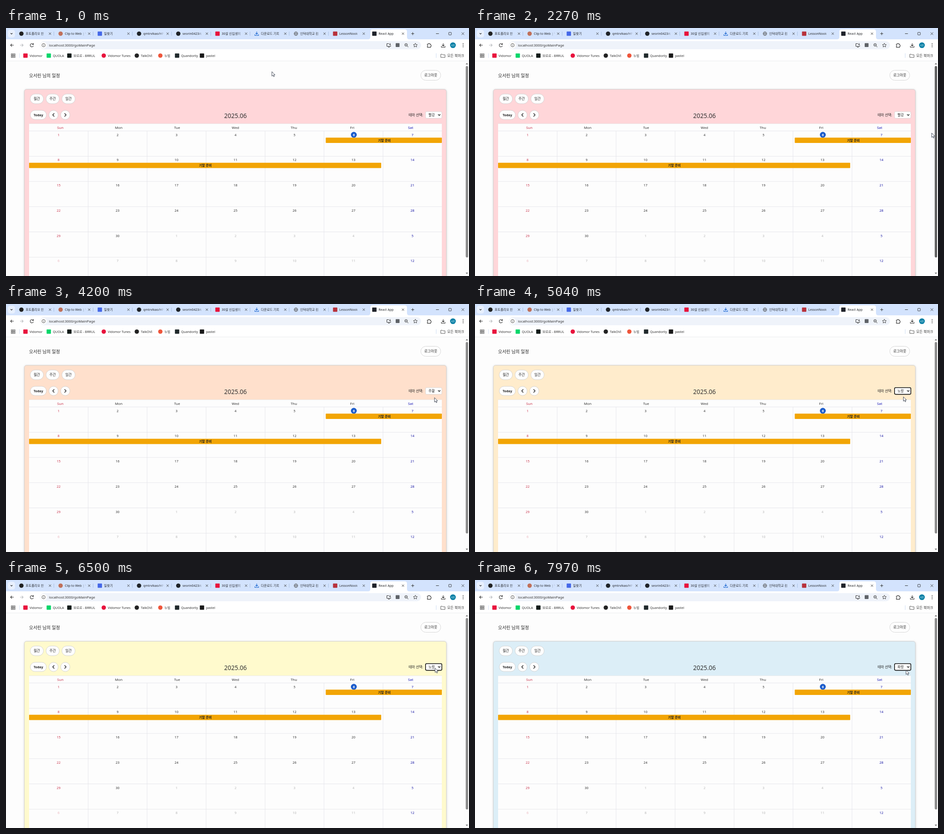
Write an HTML page that moves like this. It is 1023x548 px and loops after 8 s.

```html
<!DOCTYPE html>
<html lang="ko">
<head>
<meta charset="utf-8">
<title>Calendar themes</title>
<style>
html, body { margin: 0; width: 100%; height: 100%; overflow: hidden; background: #fdfdfd; }
svg { display: block; width: 1023px; height: 548px; }
text { font-family: 'Noto Sans', 'Noto Sans CJK KR', sans-serif; white-space: pre; }
</style>
</head>
<body>
<svg id="stage" viewBox="0 0 1023 548">
  <defs>
    <linearGradient id="fade">
      <stop stop-color="#d3e3fd" stop-opacity="0"/><stop offset="1" stop-color="#d3e3fd"/>
    </linearGradient>
    <clipPath id="titles"><rect id="clipBox" x="0" y="0" width="1023" height="25"/></clipPath>
    <filter id="soft" x="-5%" y="-5%" width="110%" height="110%"><feGaussianBlur stdDeviation="2"/></filter>
  </defs>
</svg>
<script>
const stage = document.getElementById('stage');
const out = [];
const add = s => out.push(s);
const rect = (x, y, w, h, fill, rx = 0, more = '') =>
  add(`<rect x="${x}" y="${y}" width="${w}" height="${h}" rx="${rx}" fill="${fill}" ${more}/>`);
const circle = (x, y, r, fill, more = '') =>
  add(`<circle cx="${x}" cy="${y}" r="${r}" fill="${fill}" ${more}/>`);
const path = (d, color = '#3c4043', width = 1, fill = 'none', more = '') =>
  add(`<path d="${d}" stroke="${color}" stroke-width="${width}" fill="${fill}" ${more}/>`);
const text = (s, x, y, size, fill = '#222', weight = 400, anchor = 'start', more = '') =>
  add(`<text x="${x}" y="${y}" font-size="${size}" fill="${fill}" font-weight="${weight}" text-anchor="${anchor}" ${more}>${s}</text>`);
const cross = (x, y, r) => path(`M${x - r} ${y - r}l${2 * r} ${2 * r}m0 ${-2 * r}l${-2 * r} ${2 * r}`, '#333', .9);
const mark = (round, x, y, r, color) =>
  round ? circle(x, y, r, color) : rect(x - r, y - r, 2 * r, 2 * r, color, 1);
const globe = (x, y) => {
  circle(x, y, 4, 'none', 'stroke="#555"');
  path(`M${x - 4} ${y}h8M${x} ${y - 4}q-3.5 4 0 8q3.5 -4 0 -8`, '#555', .8);
};
const download = (x, y, color) =>
  path(`M${x} ${y - 4.5}v6m-2.6 -2.6l2.6 2.6l2.6 -2.6M${x - 4} ${y + 1.5}v2.5h8v-2.5`, color, 1.2);

function tabs() {
  rect(0, 0, 1023, 25, '#d3e3fd');
  rect(4, 4, 16, 17, '#e8f0fe', 5);
  path('M10 11.3l2.2 2.2l2.2 -2.2', '#222', 1.1);
  path('M800 25q5 0 5 -5V8q0 -5 5 -5H881q5 0 5 5V20q0 5 5 5z', 'none', 0, '#fff');
  const list = [
    ['포트폴리오 한', 1, '#222'], ['Clip to Web | 변', 1, '#c0705a'], ['일찾기', 0, '#4568e8'],
    ['qmtrvlkao/HP', 1, '#1f2328'], ['seorin0423/c', 1, '#1f2328'], ['30살 신입생의', 0, '#e8123c'],
    ['다운로드 기록', 'arrow'], ['인덕대학교 컴', 'globe'], ['LessonNook', 0, '#b8323c'], ['React App', 0, '#20232a']];
  list.forEach(([name, kind, color], i) => {
    const x = 34 + 86.66 * i;
    if (kind === 'arrow') download(x, 12.5, '#1a66d0');
    else if (kind === 'globe') globe(x, 12.5);
    else mark(kind, x, 12.5, 4.8, color);
    text(name, x + 9.3, 15.3, 7, '#26282c');
    if (i < 9) {
      rect(x + 45, 4, 10, 18, 'url(#fade)');
      rect(x + 55, 4, 16, 18, '#d3e3fd');
      if (i < 8) rect(x + 71.4, 8, .8, 9, '#9fb8dc');
    }
    cross(x + 63.2, 12.5, 2.4);
  });
  path('M895.5 12.5h6.4m-3.2 -3.2v6.4M950 12.5h6.5', '#333', 1);
  rect(978.3, 9.7, 5.6, 5.6, 'none', .5, 'stroke="#333" stroke-width=".9"');
  cross(1009.5, 12.5, 2.8);
}

function toolbar() {
  rect(0, 25, 1023, 48, '#fff');
  rect(75, 29, 842, 18, '#eff3fa', 9);
  circle(83, 38, 7, '#fff');
  circle(83, 38, 3.7, 'none', 'stroke="#444" stroke-width=".9"');
  path('M83 37.5v2.5M83 35.6v.9', '#444', .9);
  path('M17 38h-7m3.2 -3.2l-3.2 3.2l3.2 3.2', '#333', 1.1);
  path('M31 38h7m-3.2 -3.2l3.2 3.2l-3.2 3.2', '#b5b8bc', 1.1);
  path('M60 36a3.6 3.6 0 1 0 .5 3.3M60.6 33.6v2.8h-2.8', '#333', 1.1);
  text('localhost:3000/goMainPage', 95, 41, 7.8, '#333');
  path('M846 34.5h-4.5v6h8.5v-2M844 42.3h4M848.5 33.5v4m-1.8 -1.7l1.8 1.8l1.8 -1.8', '#333', 1);
  rect(861, 33.5, 8.5, 8.5, '#5f6368', 1);
  circle(884, 37.3, 2.9, 'none', 'stroke="#333"');
  path('M886.2 39.5l2.8 2.8M882.6 37.3h2.8', '#333');
  path('M904.5 33.6l1.3 2.9l3.1 .3l-2.3 2.1l.7 3.1l-2.8 -1.6l-2.8 1.6l.7 -3.1l-2.3 -2.1l3.1 -.3z', '#333', .9);
  path('M931 35.5h2.3a1.4 1.4 0 0 1 2.8 0h2.2v2.3a1.4 1.4 0 0 1 0 2.8v2h-7.3v-2.2a1.4 1.4 0 0 0 0 -2.7z', '#333', 1.1);
  download(966, 38.5, '#333');
  circle(987.5, 38, 6.3, '#087fa5');
  text('서린', 987.5, 39.6, 4.5, '#e4f4fa', 400, 'middle');
  [34.5, 38, 41.5].forEach(y => circle(1010, y, .9, '#333'));

  for (let i = 0; i < 6; i++)
    rect(11.5 + i % 3 * 3.2, 57 + (i / 3 | 0) * 4.8, 2.3, 3.3, 'none', 0, 'stroke="#444" stroke-width=".8"');
  rect(29.5, 56, .8, 10, '#c5d5ef');
  [['Vidomor', 0, 43, '#e8123c'], ['QUOLA', 0, 94.5, '#08d66a'], ['보르르 - BRRUL', 0, 140, '#101a18'],
   ['Vidomor Tunes', 1, 216, '#e8123c'], ['TalkOVI', 1, 289, '#222'], ['누빔', 1, 341, '#ee553a'],
   ['Quandorily', 0, 378, '#20292b'], ['pastel', 0, 433, '#191919']].forEach(([name, round, x, color]) => {
    mark(round, x, 61, 4.8, color);
    text(name, x + 9, 63.5, 7.1, '#333');
  });
  rect(950, 56, .8, 10, '#c5d5ef');
  path('M960.7 58h3.3l1.2 1.2h4.8v5.8h-9.3z', '#444', .9);
  text('모든 북마크', 975, 63.5, 7.6, '#333');
  rect(0, 72.5, 1023, .8, '#e4e6ea');
}

const pill = (x, y, w, h) => rect(x, y, w, h, '#fefefe', h / 2, 'stroke="#ccc" stroke-width=".8"');

function page() {
  text('오서린 님의 일정', 51, 108.5, 9.8, '#222', 500);
  pill(916.5, 93.5, 44, 22);
  text('로그아웃', 938.5, 107.3, 7.8, '#222', 500, 'middle');
  rect(40.5, 136, 933, 430, '#aaa', 5, 'filter="url(#soft)" opacity=".5"');
  rect(40.5, 135.5, 932.5, 430, '#ffd6d9', 5, 'id="panel" stroke="#c9c9c9" stroke-width=".8"');
  ['월간', '주간', '일간'].forEach((s, i) => {
    pill(53.5 + 35 * i, 145.8, 29.2, 21.4);
    text(s, 68.1 + 35 * i, 159.3, 7.8, '#222', 500, 'middle');
  });
  pill(53.7, 182, 35.6, 20.2);
  text('Today', 71.5, 194.8, 7.2, '#222', 600, 'middle');
  [[105, -1], [131, 1]].forEach(([x, d]) => {
    circle(x, 192.1, 10.2, '#fefefe', 'stroke="#ccc" stroke-width=".8"');
    path(`M${x - d * 1.7} 188.5l${d * 3.5} 3.6l${-d * 3.5} 3.6`, '#222', 1.4);
  });
  text('2025.06', 507, 198.8, 13.5, '#333', 400, 'middle');
  text('테마 선택:', 889.5, 194.8, 7.7, '#222');
  rect(927, 184.8, 36, 14.8, '#fff', 2.5, 'id="select"');
  text('', 933.5, 194.8, 7.6, '#222', 400, 'start', 'id="choice"');
  path('M954.7 190.8l2.5 2.5l2.5 -2.5', '#222', 1.4);
}

function calendar() {
  const left = 51, col = 130.3, top = 227.6, row = 55.75;
  rect(left, 211.5, 912, 340, '#fdfdfd');
  for (let i = 0; i < 6; i++) {
    rect(left, top + row * i - .4, 912, .8, '#e2e2e8');
    rect(left + col * (i + 1) - .2, top, .8, 330, '#e2e2e8');
  }
  rect(left, 211.3, 912, .7, '#e5e5e5');
  ['Sun', 'Mon', 'Tue', 'Wed', 'Thu', 'Fri', 'Sat'].forEach((s, i) =>
    text(s, 120 + 129 * i, 222.8, 7.8, i === 0 ? '#c8334b' : i === 6 ? '#1414b4' : '#333', 400, 'middle'));
  for (let i = 0; i < 42; i++) {
    const c = i % 7, r = i / 7 | 0, next = i >= 30;
    const x = 116 + col * c + .2, y = 238.7 + row * r;
    const day = next ? i - 29 : i + 1;
    if (day === 6 && !next) {
      circle(x + .8, y - 2.7, 6.5, '#1c5ccb');
      text(day, x + .8, y, 7.4, '#fff', 700, 'middle');
      continue;
    }
    const color = c === 0 ? (next ? '#e9b3bb' : '#c8334b') : c === 6 ? '#1414a4' : next ? '#b5b5b5' : '#333';
    text(day, x, y, 7.4, color, c === 6 ? 500 : 400, 'middle');
  }
  rect(706.5, 242.3, 256.5, 11.8, '#f2a505', 1);
  rect(51, 297.8, 778, 11.8, '#f2a505', 1);
  text('기말 준비', 836, 250.8, 7.1, '#222', 700, 'middle');
  text('기말 준비', 440.5, 306.3, 7.1, '#222', 700, 'middle');
}

function scrollbar() {
  rect(1013.5, 73.3, 9.5, 475, '#fcfcfc');
  path('M1018.3 77l2.6 3.6h-5.2zM1018.3 544l2.6 -3.6h-5.2z', 'none', 0, '#777');
  rect(1015.8, 84, 5.2, 423, '#8b8b8b', 2.6, 'id="thumb"');
}

tabs();
toolbar();
page();
calendar();
scrollbar();
path('M0 0V9.8L2.3 7.7L3.9 11.2L5.5 10.5L3.9 7.1H6.9Z', '#333a4a', .9, '#fff', 'id="cursor"');
stage.insertAdjacentHTML('beforeend', out.join(''));

const [panel, select, choice, thumb, cursor] =
  ['panel', 'select', 'choice', 'thumb', 'cursor'].map(id => document.getElementById(id));

// Start time, label, colour
const themes = [
  [-1000, '빨강', [255, 214, 217]], [3400, '주황', [255, 224, 204]], [4900, '노랑', [255, 250, 205]],
  [6800, '초록', [220, 255, 220]], [7750, '파랑', [220, 235, 253]]];
const focused = [[2950, 3850], [4550, 5650], [6450, 7200], [7650, 8000]];
// Time, x, y
const route = [
  [0, 587.5, 96.5], [350, 587.5, 96.5], [1250, 1016, 215], [2270, 1009, 232], [2500, 1009, 232],
  [2950, 948, 192], [3350, 946.5, 222], [3850, 946.5, 222], [4550, 947, 192], [5040, 946.5, 205],
  [5650, 947.8, 260], [6140, 947.8, 260], [6450, 948, 192], [6800, 948, 235], [7200, 949.5, 276],
  [7500, 949.5, 276], [7650, 950, 194], [7970, 952.3, 199], [8000, 952.3, 199]];
const ease = u => u * u * (3 - 2 * u);
const within = (t, [a, b]) => t >= a && t < b;

function draw(t) {
  const k = themes.findLastIndex(th => t >= th[0]);
  const [start, label, color] = themes[k];
  const from = themes[Math.max(0, k - 1)][2];
  const u = ease(Math.min(1, (t - start) / 300));
  panel.setAttribute('fill', `rgb(${color.map((v, i) => Math.round(from[i] + (v - from[i]) * u))})`);
  choice.textContent = label;

  const focus = focused.some(f => within(t, f));
  select.setAttribute('stroke', focus ? '#151515' : '#ccc');
  select.setAttribute('stroke-width', focus ? 1.6 : .7);
  thumb.setAttribute('fill', within(t, [1200, 2500]) ? '#606060' : '#8b8b8b');

  const j = route.findIndex(p => t < p[0]);
  const [t0, x0, y0] = route[j - 1], [t1, x1, y1] = route[j];
  const e = ease((t - t0) / (t1 - t0));
  cursor.setAttribute('transform', `translate(${x0 + (x1 - x0) * e} ${y0 + (y1 - y0) * e})`);
}

function tick() {
  draw(performance.now() % 8000);
  requestAnimationFrame(tick);
}
tick();
</script>
</body>
</html>
```
